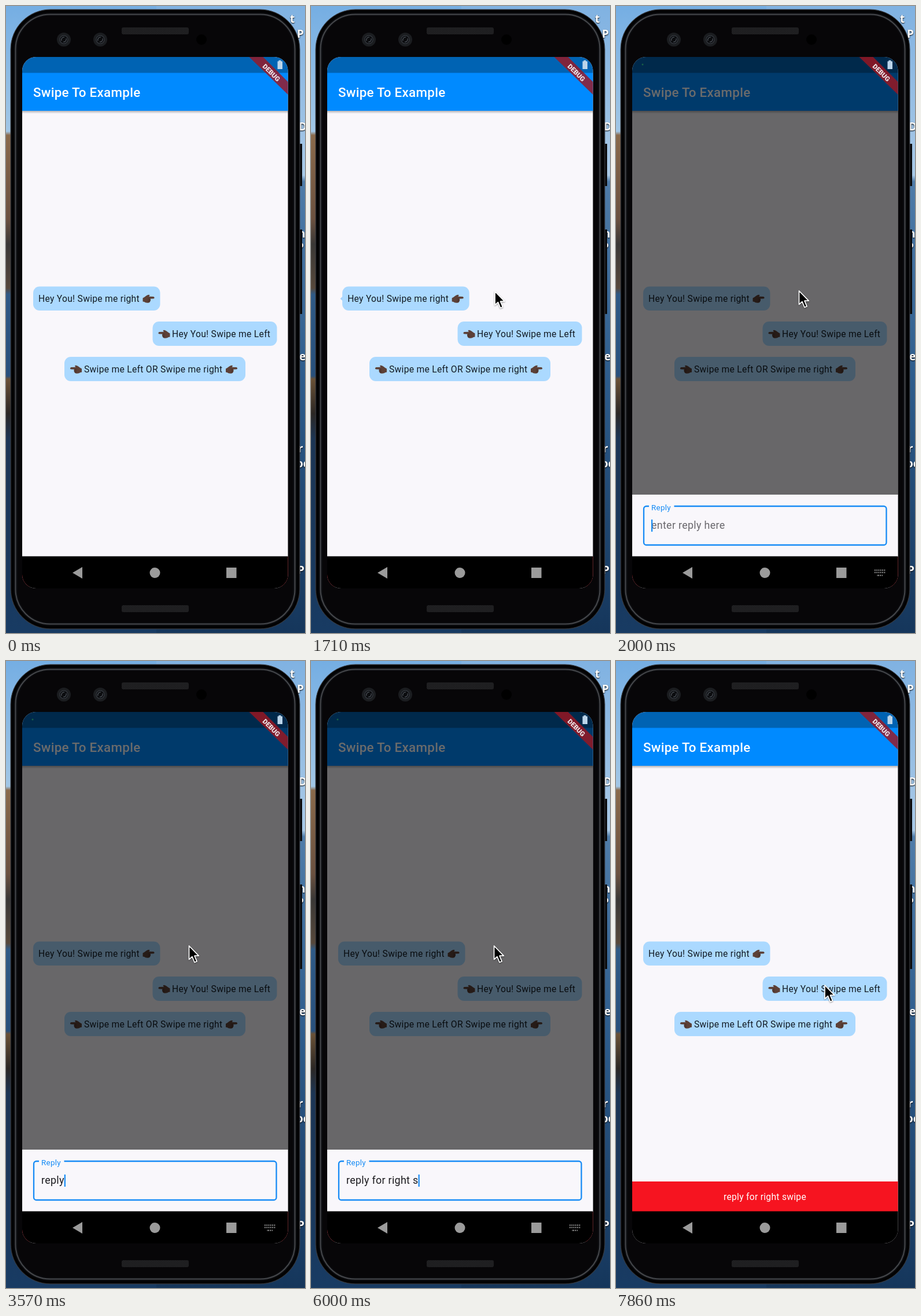
Animation, 517 px wide and 1083 px high, one loop 8000 ms. Source, as an HTML page:

```html
<!DOCTYPE html>
<html lang="en">
<head>
<meta charset="utf-8">
<title>Swipe To Example</title>
<style>
  html, body { margin: 0; width: 100%; height: 100%; overflow: hidden; background: #16365c; }
  svg { display: block; width: 517px; height: 1083px; }
  text { font: 15.66px Roboto, sans-serif; letter-spacing: .28px; white-space: pre; fill: #131c24; }
  .title { font-size: 22.4px; font-weight: 500; fill: #fff; }
  .input { font-size: 17.9px; letter-spacing: .3px; }
  .label { font-size: 13.4px; }
  .desk text { font: bold 19px "Open Sans", sans-serif; letter-spacing: 0; fill: #fff; text-shadow: 0 1px 2px #000; }
</style>
</head>
<body>
<svg viewBox="0 0 517 1083">
  <defs>
    <linearGradient id="left" x2="0" y2="1">
      <stop offset="0" stop-color="#75aee3"/><stop offset=".2" stop-color="#a2c7e6"/>
      <stop offset=".206" stop-color="#8a6a4b"/><stop offset=".34" stop-color="#6b5140"/>
      <stop offset=".38" stop-color="#3a3836"/><stop offset=".45" stop-color="#57483b"/>
      <stop offset=".46" stop-color="#2f5a86"/><stop offset=".59" stop-color="#28507c"/>
      <stop offset=".595" stop-color="#6a5136"/><stop offset=".65" stop-color="#2b2724"/>
      <stop offset=".69" stop-color="#1c3554"/><stop offset="1" stop-color="#183b63"/>
    </linearGradient>
    <linearGradient id="right" x2="0" y2="1">
      <stop offset="0" stop-color="#80b2e2"/><stop offset=".27" stop-color="#a9c9e6"/>
      <stop offset=".28" stop-color="#4f7ca9"/><stop offset=".6" stop-color="#2d5c8c"/>
      <stop offset="1" stop-color="#15365b"/>
    </linearGradient>
    <linearGradient id="shade" x2="0" y2="1">
      <stop offset="0" stop-opacity=".28"/><stop offset="1" stop-opacity="0"/>
    </linearGradient>
    <pattern id="mesh" width="3" height="3" patternUnits="userSpaceOnUse">
      <path fill="#262628" d="M0 0h3v3h-3z"/><path fill="#171719" d="M0 0h1.5v1.5h-1.5zM1.5 1.5h1.5v1.5h-1.5z"/>
    </pattern>
    <clipPath id="screen"><rect x="28" y="88" width="459.5" height="918" rx="24"/></clipPath>
    <g id="hand">
      <path fill="#5c4037" d="M0 6Q3 4.5 6 2Q9-.2 11.5.5Q12.6 1.3 10.5 3.3L18.5 3.6Q20.5 4.3 20 6Q19.7 7 18 7L12.8 7.2Q14.3 8.2 13.3 9.6Q13.8 11 12.6 11.8Q12.4 13.5 10.5 14Q5 14.8 2.5 12.6L0 12Z"/>
      <path fill="none" stroke="#3b2925" stroke-width=".7" d="M12.8 7.2H9M13.3 9.6H9M12.6 11.8H8.7"/>
    </g>
    <g id="lens">
      <circle r="12" fill="#1b1d20"/><circle r="7" fill="#0b0c0f" stroke="#30343a" stroke-width="1.5"/>
      <path d="M-4 2A4.5 4.5 0 0 1 1-4M4-2A4.5 4.5 0 0 1-1 4" fill="none" stroke="#50565d" stroke-width="1.2"/>
    </g>
  </defs>

  <g class="desk">
    <rect width="260" height="1083" fill="url(#left)"/>
    <rect x="260" width="257" height="1083" fill="url(#right)"/>
    <g id="names"></g>
  </g>

  <path fill="#0b0b0d" d="M505 238h7v73h-7zM505 386h7v146h-7z"/>
  <rect x="8" y="6" width="500" height="1070" rx="69" fill="#0c0d10" stroke="#3c3e42"/>
  <rect x="11.5" y="9.5" width="493" height="1063" rx="65" fill="none" stroke="#020203" stroke-width="4"/>
  <rect x="16.5" y="14.5" width="483" height="1053" rx="60" fill="none" stroke="#46484c" stroke-width="2"/>
  <rect x="20" y="17" width="476" height="1048" rx="56" fill="#070608"/>
  <rect x="200" y="37" width="116" height="12" rx="3" fill="url(#mesh)"/>
  <rect x="200" y="1035" width="116" height="12" rx="3" fill="url(#mesh)"/>
  <use href="#lens" x="100" y="58"/><use href="#lens" x="163" y="58"/>
  <circle cx="338" cy="58" r="9" fill="#000"/>

  <g clip-path="url(#screen)">
    <path fill="#f9f7fb" d="M28 88h460v919h-460z"/>
    <path fill="url(#shade)" d="M28 181h460v5h-460z"/>
    <path fill="#008aff" d="M28 115h460v66h-460z"/>
    <path fill="#0063b3" d="M28 88h460v27.5h-460z"/>
    <text class="title" x="47" y="157">Swipe To Example</text>

    <path id="reply" fill="#008aff" d="M62 501v-6l-11.5 10.5 11.5 10.5v-6q8 0 13 6q-2-13-13-15z"/>
    <g id="first">
      <rect x="47" y="484.5" width="219.5" height="41.5" rx="11" fill="#abd9ff"/>
      <text x="56" y="511">Hey You! Swipe me right</text><use href="#hand" x="236.5" y="498.5"/>
    </g>
    <rect x="253.5" y="545" width="215" height="42" rx="11" fill="#abd9ff"/>
    <use href="#hand" transform="translate(283.5 559.5) scale(-1 1)"/><text x="287" y="572">Hey You! Swipe me Left</text>
    <rect x="101" y="606" width="313" height="42" rx="11" fill="#abd9ff"/>
    <use href="#hand" transform="translate(131 620.5) scale(-1 1)"/>
    <text x="135" y="633">Swipe me Left OR Swipe me right</text><use href="#hand" x="380" y="620.5"/>

    <g id="snack">
      <path fill="#f61420" d="M28 899h460v52h-460z"/>
      <text x="257.5" y="930.5" text-anchor="middle" style="fill:#fff">reply for right swipe</text>
    </g>
    <path id="dim" d="M28 88h460v863h-460z"/>
    <g id="sheet">
      <path fill="#f9f7fb" d="M28 844h460v108h-460z"/>
      <rect id="border" x="48" y="864" width="419.5" height="67" rx="4.5" fill="none"/>
      <path fill="#f9f7fb" d="M57 861h43.5v6h-43.5z"/>
      <text class="label" id="label" x="61" y="870.5">Reply</text>
      <text class="input" id="input" x="61" y="902.5"></text>
      <rect id="caret" y="887" width="2.2" height="21" fill="#168bf5"/>
    </g>

    <path fill="#000" d="M28 950.5h460v57h-460z"/>
    <path fill="#9b9b9b" d="M115 979l17-10v20zM381 970h17.5v18h-17.5z"/>
    <circle cx="257.5" cy="979" r="9" fill="#9b9b9b"/>
    <path id="keys" fill="none" stroke="#a5a5a5" stroke-width="1.8" stroke-dasharray="1.8 1.5" d="M447 974.5h19M447 978.5h19M451.5 983.5h1M453 983.5h8" />
    <circle id="dot" cx="46" cy="101" r="1.5" fill="#176047"/>

    <path fill="#a0141f" fill-opacity=".8" d="M420.5 88h24L488 131.5v22z"/>
    <text transform="translate(459 115) rotate(45)" y="4.3" text-anchor="middle" style="font:900 11.6px Roboto,sans-serif;letter-spacing:0;fill:#eee5e8">DEBUG</text>
    <path fill="#bcd5ea" d="M469.5 95.5h2v-1.7h4v1.7h2.5v13.5h-8.5z"/>
  </g>

  <path id="mouse" stroke="#fff" stroke-width="1.7" stroke-linejoin="round" d="M0 0V23.5L5.4 18.6L9.5 28.5L13.5 26.8L9.5 17.2H16.7Z" style="filter:drop-shadow(0 1px 1px #0006)"/>
</svg>
<script>
const LOOP = 8000, TICK = 1000 / 7;
const MESSAGE = 'reply for right swipe';
// tick at which each letter is typed
const KEYS = [20, 21, 23, 24, 25, 26, 27, 28, 29, 30, 32, 33, 35, 37, 38, 40, 42, 43, 44, 45, 47];
const PATH = [[140, 528, 640], [1000, 178, 503], [1290, 178, 503], [1580, 318, 493],
              [1715, 318, 493], [1990, 316.5, 492], [7280, 316.5, 492], [7840, 361, 560]];

const $ = id => document.getElementById(id);
const set = (id, attrs) => { for (const k in attrs) $(id).setAttribute(k, attrs[k]); };
const show = (id, on) => set(id, { visibility: on ? 'visible' : 'hidden' });
const ramp = (t, a, b) => Math.min(1, Math.max(0, (t - a) / (b - a)));
const easeOut = k => 1 - (1 - k) ** 3;
const smooth = k => k * k * (3 - 2 * k);

// clipped desktop file names
$('names').innerHTML = [['t', 491, 29], ['P', 503, 55], ['D', 506, 215], ['n', 505, 400], ['P', 503, 423],
  ['e', 507, 612], ['r', 505, 771], ['oc', 502, 797], ['P', 504, 981]]
  .map(([s, x, y]) => `<text x="${x}" y="${y}">${s}</text>`).join('');

function pointer(t) {
  let i = PATH.findIndex(p => p[0] > t);
  if (i < 0) i = PATH.length;
  const a = PATH[Math.max(0, i - 1)], b = PATH[Math.min(i, PATH.length - 1)];
  const k = a === b ? 0 : smooth(ramp(t, a[0], b[0]));
  return [a[1] + (b[1] - a[1]) * k, a[2] + (b[2] - a[2]) * k];
}

function draw(t) {
  const tick = Math.round(t / TICK);

  show('mouse', t > 100);
  set('mouse', { transform: `translate(${pointer(t)})` });

  const slide = t < 1585 ? easeOut(ramp(t, 1430, 1580)) : 1 - ramp(t, 1585, 1730);
  set('first', { transform: `translate(${66 * slide})` });
  set('reply', { opacity: Math.sqrt(slide) });

  const open = t < 5000 ? easeOut(ramp(t, 1720, 1980)) : 1 - ramp(t, 7117, 7317);
  const focused = open > 0 && t < 7050;
  const color = focused ? '#168bf5' : '#55768f';
  set('dim', { opacity: .58 * open });
  set('sheet', { transform: `translate(0 ${107 * (1 - open)})` });
  show('sheet', open > 0);
  set('border', { stroke: color, 'stroke-width': focused ? 2.3 : 1.4 });
  $('label').style.fill = color;
  show('keys', focused);
  show('dot', open > 0);

  const typed = KEYS.filter(k => k <= tick).length;
  const input = $('input');
  input.textContent = typed ? MESSAGE.slice(0, typed) : 'enter reply here';
  input.style.fill = typed ? '#1c1b1f' : '#69676c';
  const since = (tick - (typed ? KEYS[typed - 1] : 13)) * TICK;
  set('caret', { x: 61 + (typed ? input.getComputedTextLength() : 0) });
  show('caret', focused && since % 1000 < 500);

  set('snack', { transform: `translate(0 ${52 * (1 - easeOut(ramp(t, 7340, 7600)))})` });
}

function frame(now) {
  draw(Math.floor(now % LOOP / TICK + .05) * TICK);
  requestAnimationFrame(frame);
}
requestAnimationFrame(frame);
</script>
</body>
</html>
```
